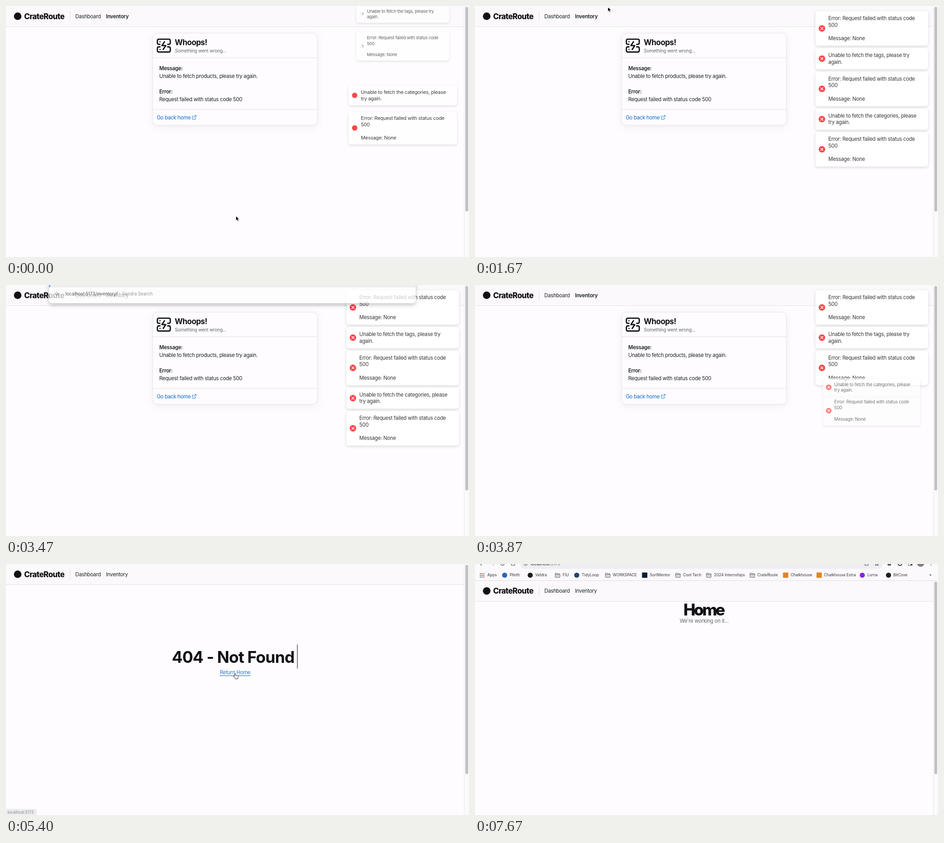
An HTML page that plays this animation: 1015 by 551 pixels, repeating every 7790 ms.

```html
<!DOCTYPE html>
<html lang="en">
<head>
<meta charset="utf-8">
<title>Inventory error states</title>
<style>
  html, body { margin: 0; height: 100%; overflow: hidden; background: #fefcfe; }
  svg { display: block; width: 100vw; height: 100vh; }
  text { font: 400 11.28px Inter, sans-serif; letter-spacing: -.022em; fill: #1c2024; white-space: pre; }
  .brand { font-size: 16.9px; font-weight: 800; letter-spacing: -.036em; fill: #111113; }
  .bold { font-weight: 600; }
  .title { font-size: 16.9px; font-weight: 700; letter-spacing: -.03em; fill: #111113; }
  .sub { font-size: 9.87px; letter-spacing: -.0155em; fill: #60646c; }
  .muted { fill: #60646c; }
  .link { fill: #0b68cb; }
  .big { font-size: 35.25px; font-weight: 700; letter-spacing: -.025em; fill: #111113; }
  .home { font-weight: 800; letter-spacing: -.1em; }
  .mid { text-anchor: middle; }
  .toast text { fill: #363636; }
  .small { font-size: 8.46px; letter-spacing: 0; fill: #333438; }
  .omni { font-size: 9.87px; letter-spacing: -.01em; fill: #28282b; }
  .line { fill: none; stroke-linecap: round; stroke-linejoin: round; }
  .toast > rect { filter: drop-shadow(0 2px 3px rgba(0, 0, 0, .14)); }
  #card > rect { filter: drop-shadow(0 4px 8px rgba(0, 0, 40, .06)); }
  #drop > .panel { filter: drop-shadow(0 4px 5px rgba(0, 0, 0, .3)); }
</style>
</head>
<body>
<svg id="stage" viewBox="0 0 1015 551" preserveAspectRatio="none"></svg>
<script>
const LOOP = 7790, SHIFT = 36.7;
const stage = document.getElementById('stage');

const text = (x, y, s, cls = '') => `<text x="${x}" y="${y}" class="${cls}">${s}</text>`;
const rect = (x, y, w, h, fill, more = '') =>
  `<rect x="${x}" y="${y}" width="${w}" height="${h}" fill="${fill}" ${more}/>`;
const dot = (x, y, r, fill, more = '') => `<circle cx="${x}" cy="${y}" r="${r}" fill="${fill}" ${more}/>`;
const line = (d, stroke, width, more = '') =>
  `<path class="line" d="${d}" stroke="${stroke}" stroke-width="${width}" ${more}/>`;

// Toasts: top to bottom, with start time and the stack offset still to cover at t = 0
const failed = ['Error: Request failed with status code', '500', '', 'Message: None'];
const toasts = [
  { y: 49.2, start: 20, lag: 0, lines: failed },
  { y: 115.5, start: -73, lag: -58.5, lines: ['Unable to fetch the tags, please try', 'again.'] },
  { y: 181.9, start: -73, lag: -28, lines: failed },
  { y: 248.3, start: -174, lag: -44.7, lines: ['Unable to fetch the categories, please', 'try again.'] },
  { y: 314.6, start: -174, lag: -34, lines: failed },
];
for (const t of toasts) t.h = t.lines.length * 14.66 + 17;

const toastMarkup = ({ h, lines }) => `<g class="toast">
  ${rect(-123.4, -h / 2, 246.8, h, '#fff', 'rx="5.6"')}
  <g transform="translate(-109.3 0)">
    <g class="spin">${dot(0, 0, 3.8, 'none', 'stroke="#e4e4e4" stroke-width="1.4"')}
      ${line('M0-3.8A3.8 3.8 0 0 1 3.8 0', '#616161', 1.4)}</g>
    <g class="disc">${dot(0, 0, 7.05, '#fc4145')}</g>
    <g class="cross">${line('M-2.7-2.7L2.7 2.7M2.7-2.7L-2.7 2.7', '#fff', 1.4)}</g>
  </g>
  ${lines.map((s, i) => text(-95.2, (i - lines.length / 2) * 14.66 + 11.2, s)).join('')}</g>`;

const card = `<g id="card">
  ${rect(321.7, 59.7, 361.2, 202, '#fefcfe', 'rx="11" stroke="#e4e3e9"')}
  ${line('M322 113.5H683M322 227.2H683', '#e0dfe6', 1)}
  ${line('M6 10H4a2 2 0 0 1-2-2V4a2 2 0 0 1 2-2h16a2 2 0 0 1 2 2v4a2 2 0 0 1-2 2h-2' +
    'M6 14H4a2 2 0 0 0-2 2v4a2 2 0 0 0 2 2h16a2 2 0 0 0 2-2v-4a2 2 0 0 0-2-2h-2' +
    'M6 6h.01M6 18h.01M13 6l-4 6h6l-4 6', '#111113', 2, 'transform="translate(329.1 70) scale(1.41)"')}
  ${text(370, 86, 'Whoops!', 'title')}
  ${text(370.3, 101.6, 'Something went wrong...', 'sub')}
  ${text(336, 141, 'Message:', 'bold')}
  ${text(336, 158, 'Unable to fetch products, please try again.')}
  ${text(336, 191.8, 'Error:', 'bold')}
  ${text(336, 208.7, 'Request failed with status code 500')}
  ${text(330.4, 248.8, 'Go back home', 'link')}
  ${line('M15 3h6v6M10 14L21 3M18 13v6a2 2 0 0 1-2 2H5a2 2 0 0 1-2-2V8a2 2 0 0 1 2-2h6',
    '#0b68cb', 2, 'transform="translate(407 238.8) scale(.47)"')}</g>`;

const notFound = `<g id="missing">
  ${text(363.5, 217, '404 - Not Found', 'big')}
  ${rect(637.8, 176.8, 2, 52.6, '#77777b', 'id="caret"')}
  <g id="back">${text(502.3, 242, 'Return Home', 'mid')}${rect(468.5, 244.7, 67.5, 1, '#0b58c0')}</g></g>`;

const home = `<g id="home">${text(457, 76, 'Home', 'big home')}
  ${text(502.3, 92.4, "We're working on it...", 'muted mid')}</g>`;

const dropdown = `<g id="drop">
  <path class="panel" d="M94.5-10H898V33q0 7-7 7H101.5q-7 0-7-7Z" fill="#fff"/>
  ${rect(94.5, -5, 803.5, 10.5, '#ebebee')}${rect(94.5, -5, 2.2, 10, '#2b6fd6', 'rx="1"')}
  ${dot(110.5, 19, 2.8, 'none', 'stroke="#6b6b70"')}${line('M112.7 21.2L115 23.5', '#6b6b70', 1)}
  <text x="130.5" y="23.4" class="omni">localhost:5173/inventoryf<tspan fill="#77777c"> - Fendra Search</tspan></text></g>`;

// Bookmarks: text x, label, icon x, icon colour, shape
const bookmarks = [
  [27, 'Apps', 15.5, '', 'grid'], [76, 'Plinth', 65, '#2a63b8', 'dot'], [132, 'Veldra', 121, '#1d1a18', 'dot'],
  [192, 'FIU', 181], [234, 'TidyLoop', 223, '#24476b', 'dot'], [302, 'WORKSPACE', 291],
  [383, 'SortMentor', 372, '#0c1c38', 'box'], [456, 'Cool Tech', 445], [524, '2024 Internships', 512.5],
  [619, 'CrateRoute', 608], [692, 'Chalkhouse', 681, '#e08524', 'box'],
  [765, 'Chalkhouse Extra', 754.5, '#e08524', 'box'], [860, 'Lurna', 849, '#8429d8', 'dot'],
  [917, 'BitCove', 906.5, '#1b1c20', 'dot'],
];
const gridColours = ['#e0483a', '#3f9c56', '#4779d8'];
const gridIcon = x => Array.from({ length: 9 }, (_, i) => {
  const row = i / 3 | 0;
  return rect(x - 4.8 + i % 3 * 3.7, 20.2 + row * 3.7, 2.3, 2.3, gridColours[(i * 2 + row) % 3]);
}).join('');
const folder = x => `<path d="M${x - 5.3} 28.5v-7.5q0-1 1-1h3l1.2 1.4h4.4q1 0 1 1v6.1q0 1-1 1h-8.6q-1 0-1-1Z
  M${x - 5.3} 22.9h10.6" fill="#d4d4d8" stroke="#68686e" stroke-width=".9"/>`;
const icon = (x, fill, shape) =>
  shape === 'grid' ? gridIcon(x) :
  shape === 'dot' ? dot(x, 24.5, 5.6, fill) :
  shape === 'box' ? rect(x - 5.8, 18.7, 11.6, 11.6, fill) : folder(x);

const toolbar = `<g id="toolbar">
  ${rect(0, -12, 1015, 48.5, '#fbf9fc')}${rect(0, 36, 1015, 1, '#dddce1')}
  ${rect(99.5, -10, 794.5, 20.5, '#eeedf2', 'rx="10"')}
  ${line('M18-1H11M14.5-5L11-1L14.5 3', '#55555b', 1.2)}${line('M36-1H43M39.5-5L43-1L39.5 3', '#b9b9bf', 1.2)}
  ${line('M64.3-1A4 4 0 1 1 62-4.7M80-4V3H87V-4', '#55555b', 1.2)}
  ${dot(111, -1, 4.2, 'none', 'stroke="#55555b"')}${line('M111-1V1.5', '#55555b', 1)}
  <text x="122" y="2.6" class="omni">localhost:<tspan fill="#77777c">5173</tspan></text>
  ${line('M855-4V3H862V-4M878 3.5L881 1.5L884 3.5L883-1L886-3H876L879-1Z', '#55555b', 1.1)}
  ${rect(904.5, -4, 7.5, 7.5, '#55555b', 'rx="1.5"')}${dot(931.5, -1, 4.2, 'none', 'stroke="#44444a" stroke-width="2"')}
  ${rect(950, -5, 8.5, 8, 'none', 'stroke="#55555b"')}${rect(954.5, -5, 4, 8, '#55555b')}
  ${dot(977, -2, 8, '#857a7c')}${dot(999.5, 2.2, 1, '#55555b')}
  ${bookmarks.map(([x, label, ix, fill, shape]) => icon(ix, fill, shape) + text(x, 27.4, label, 'small')).join('')}
  ${text(996, 27, '»', 'small')}</g>`;

stage.innerHTML = `
  ${rect(0, 0, 1015, 551, '#fefcfe')}
  <g id="page">
    ${rect(0, 0, 1004, 45, '#fbf9fc')}${rect(0, 44.8, 1004, 1, '#e1e0e6')}
    ${dot(25.6, 22.5, 8.3, '#111113')}${text(39.7, 28.7, 'CrateRoute', 'brand')}
    ${rect(140, 11, 1, 23.5, '#e0dfe5')}${text(152, 26.8, 'Dashboard')}
    <g id="nav">${text(219.3, 26.8, 'Inventory')}</g>
    ${card}${notFound}${home}
    ${rect(1004, 0, 11, 551, '#fafafb')}${rect(1004, 0, 1, 551, '#e8e7ea')}
  </g>
  ${rect(1007, 2, 6.2, 449, '#c1c1c3', 'id="thumb" rx="3.1"')}
  <g>${toasts.map(toastMarkup).join('')}</g>
  ${dropdown}${toolbar}
  <g id="status"><path d="M0 537.5H64q3 0 3 3V551H0Z" fill="#dddee3"/>${text(3.5, 547.7, 'localhost:5173', 'small')}</g>
  <g id="cursor">
    <path id="arrow" d="M0 0V10.3L2.4 8L4 11.6L5.9 10.8L4.3 7.3H7.6Z" fill="#000" stroke="#fff" stroke-width=".9"/>
    <path id="hand" d="M-.9 1Q-.9 0 0 0T1 1V4.3Q2.2 3.7 2.9 4.7Q4.2 4.1 4.8 5.1Q7.300 4.7 7.2 6.7Q7.2 9 6.1 10.2V12.2H.6V10.8L-2.7 7.1Q-3.7 5.5-2.6 5.2T-.9 6.6Z"
      fill="#fff" stroke="#222" stroke-width=".9" stroke-linejoin="round"/>
  </g>`;

const el = Object.fromEntries([...stage.querySelectorAll('[id]')].map(e => [e.id, e]));
const toastEls = [...stage.querySelectorAll('.toast')].map(root => ({
  root, spin: root.querySelector('.spin'), disc: root.querySelector('.disc'), cross: root.querySelector('.cross'),
}));

const clamp = x => Math.max(0, Math.min(1, x));
const ramp = (t, from, to) => clamp((t - from) / (to - from));
const smooth = x => (1 - Math.cos(Math.PI * x)) / 2;
const easeOut = x => 1 - (1 - x) ** 3.5;
const backOut = x => 1 + 2.2 * (x - 1) ** 3 + 1.2 * (x - 1) ** 2;
const show = (e, on) => { e.style.display = on ? '' : 'none'; };
const place = (e, x, y, scale = 1) => e.setAttribute('transform', `translate(${x} ${y}) scale(${scale})`);

const cursorKeys = [
  [0, 504, 461], [940, 504, 461], [1270, 340, 47], [1470, 340, 47], [1800, 267, -20],
  [4380, 300, -20], [4990, 502, 240], [6270, 502, 240], [6560, 510, 105], [6590, 510, -20], [LOOP, 510, -20],
];
function cursorAt(t) {
  const i = cursorKeys.findIndex(k => k[0] > t);
  const [t0, x0, y0] = cursorKeys[i - 1], [t1, x1, y1] = cursorKeys[i];
  const p = smooth(ramp(t, t0, t1));
  return [x0 + (x1 - x0) * p, y0 + (y1 - y0) * p];
}

function drawToast(toast, { root, spin, disc, cross }, t) {
  const age = t - toast.start;
  const enter = easeOut(clamp(age / 350)), leave = easeOut(clamp((age - 4000) / 400));
  const stack = toast.lag * (1 - ramp(t, 0, 230)) ** 3.5;
  const dy = toast.h * (-2 * (1 - enter) - 1.5 * leave) + stack;
  place(root, 869.8, toast.y + dy, .6 + .4 * enter - .4 * leave);
  root.style.opacity = (.5 + .5 * enter) * (1 - leave);
  show(root, age > 0 && t < 4270);
  spin.setAttribute('transform', `rotate(${age * .36})`);
  const pop = ramp(age, 100, 330);
  show(spin, pop < 1);
  place(disc, 0, 0, pop && backOut(pop));
  place(cross, 0, 0, easeOut(ramp(age, 200, 380)));
}

function draw(t) {
  const listing = t < 4270, missing = !listing && t < 5930;
  const offset = SHIFT * smooth(ramp(t, 7340, 7670));
  place(el.page, 0, offset);
  place(el.toolbar, 0, offset - SHIFT);
  show(el.toolbar, offset > 0);
  el.thumb.setAttribute('y', 2 + offset);
  el.thumb.setAttribute('height', (listing ? 449 : 459) - offset);
  el.nav.firstChild.setAttribute('class', listing ? 'bold' : '');
  show(el.card, listing);
  show(el.missing, missing);
  show(el.home, t >= 5930);
  el.caret.style.opacity = (1 - Math.cos((t - 4835) * Math.PI / 500)) / 2;

  toasts.forEach((toast, i) => drawToast(toast, toastEls[i], t));
  el.drop.style.opacity = .75 * ramp(t, 3440, 3470) + .25 * ramp(t, 3470, 3530) - ramp(t, 3780, 3870);
  show(el.drop, t >= 3465 && t < 3870);

  const [x, y] = cursorAt(t);
  const hover = t >= 4950 && t < 6000;
  place(el.cursor, x, y);
  show(el.arrow, !hover);
  show(el.hand, hover);
  el.back.firstChild.style.fill = hover ? '#2274e8' : '#0b64d4';
  el.status.style.opacity = ramp(t, 5320, 5465) - ramp(t, 6300, 6590);
}

const began = performance.now();
function tick() {
  draw((performance.now() - began) % LOOP);
  requestAnimationFrame(tick);
}
tick();
</script>
</body>
</html>
```
